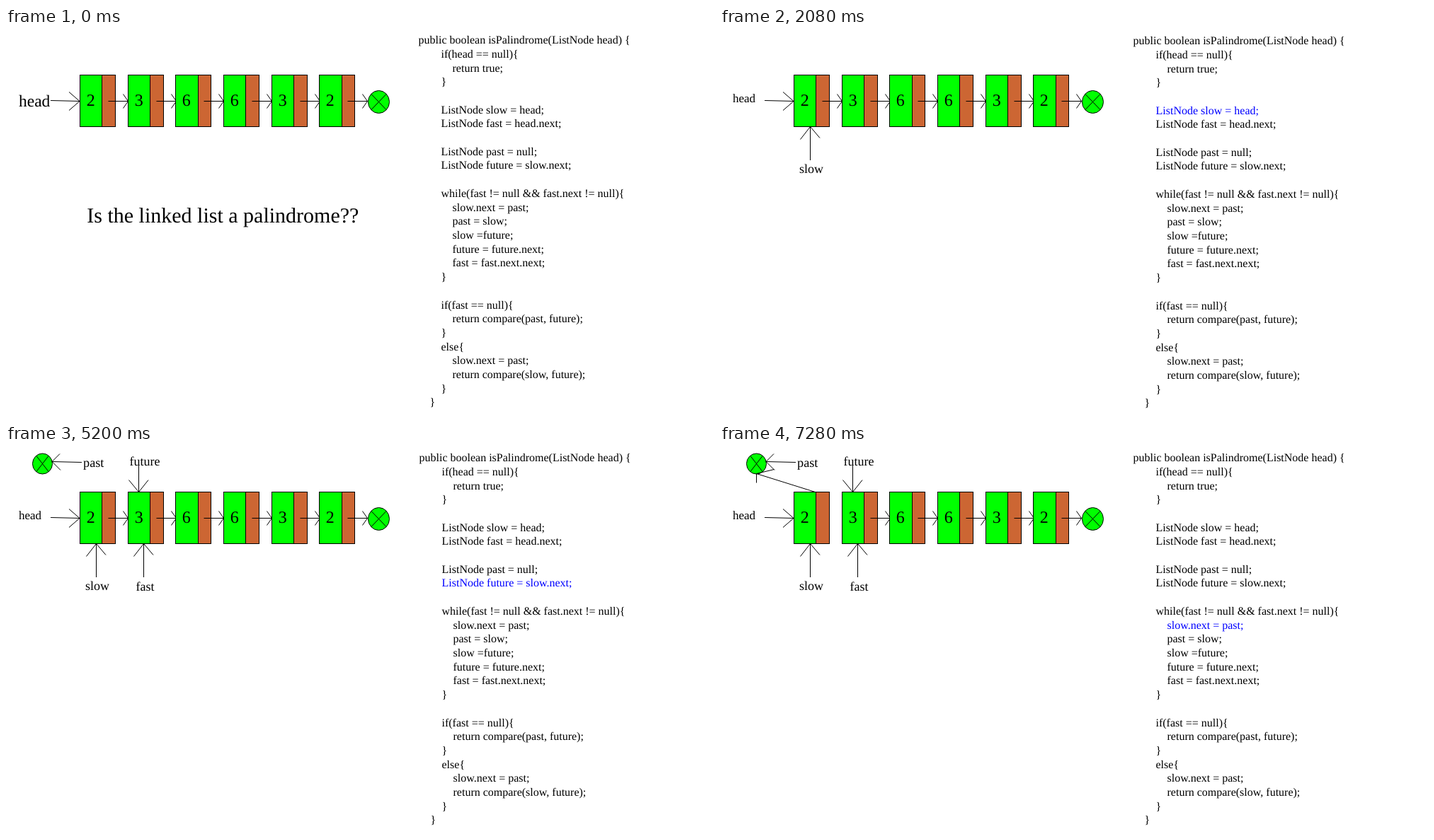
These frames come from a looping animation (1000x550 px, 8000 ms). An HTML page:

```html
<!DOCTYPE html>
<html lang="en">
<head>
<meta charset="utf-8">
<title>Linked list palindrome</title>
<style>
  html, body { margin: 0; width: 100%; height: 100%; overflow: hidden; background: #fff; }
  svg { display: block; width: 1000px; height: 550px; }
  text {
    font-family: "Liberation Serif", "Times New Roman", serif;
    white-space: pre;
    text-rendering: geometricPrecision;
  }
</style>
</head>
<body>
<svg id="stage" viewBox="0 0 1000 550"></svg>
<script>
const STEP = 1040, LOOP = 8000;
const INK = '#000', BLUE = '#0000ff', NOTE = '#000099', GREEN = '#00ff00', BROWN = '#cc6633';
const stage = document.getElementById('stage');

const code = `public boolean isPalindrome(ListNode head) {
        if(head == null){
            return true;
        }

        ListNode slow = head;
        ListNode fast = head.next;

        ListNode past = null;
        ListNode future = slow.next;

        while(fast != null && fast.next != null){
            slow.next = past;
            past = slow;
            slow =future;
            future = future.next;
            fast = fast.next.next;
        }

        if(fast == null){
            return compare(past, future);
        }
        else{
            slow.next = past;
            return compare(slow, future);
        }
    }`.split('\n');

// Code line highlighted at each step
const activeLine = [-1, 1, 5, 6, 8, 9, 11, 12];

const escape = s => s.replace(/&/g, '&amp;');
const text = (x, y, size, str, fill = INK, extra = '') =>
  `<text x="${x}" y="${y}" font-size="${size}" fill="${fill}" ${extra}>${escape(str)}</text>`;
const path = d => `<path d="${d}" fill="none" stroke="${INK}"/>`;

// Shaft from tail to tip, with both barbs given relative to the tip
const arrow = (tail, [x, y], a, b) =>
  path(`M${tail}L${x},${y}M${x + a[0]},${y + a[1]}L${x},${y}L${x + b[0]},${y + b[1]}`);

function nullMark(x, y, rx, ry, dx, dy) {
  return `<ellipse cx="${x}" cy="${y}" rx="${rx}" ry="${ry}" fill="${GREEN}" stroke="${INK}"/>` +
    path(`M${x - dx},${y - dy}l${2 * dx},${2 * dy}m0,${-2 * dy}l${-2 * dx},${2 * dy}`);
}

function node(value, i, linked) {
  const left = 103.9 + 67.7 * i;
  const x = Math.round(left) + 0.5, divider = Math.round(left + 31.4) + 0.5;
  const box = (from, to, fill) =>
    `<rect x="${from}" y="66.5" width="${to - from}" height="73" fill="${fill}" stroke="${INK}"/>`;
  return box(x, divider, GREEN) + box(divider, x + 50, BROWN) +
    text(x + 15.3, 110, 24, value, INK, 'text-anchor="middle"') +
    (linked ? arrow([x + 40, 103.5], [x + 68, 103.5], [-7, -10], [-7, 10]) : '');
}

function codeBlock(step) {
  const shift = step ? 0 : -1;
  return code.map((line, i) => {
    const x = 583.5 + shift, y = Math.round(23.2 + 19.7 * i) + shift;
    if (i !== activeLine[step]) return text(x, y, 16, line);
    const brace = line.endsWith('{') ? `<tspan fill="${INK}">{</tspan>` : '';
    return text(x, y, 16, line.replace('{', ''), BLUE).replace('</text>', brace + '</text>');
  }).join('');
}

function scene(step) {
  let out = codeBlock(step);
  out += step < 2 ? text(18, 111, 23.5, 'head') : text(18, 105, 17, 'head');
  out += [2, 3, 6, 6, 3, 2].map((v, i) => node(String(v), i, i || step < 7)).join('');
  out += arrow([63, 102.5], [104, 103.5], [-15, -13], [-15, 13]);
  out += nullMark(526.5, 104.5, 15, 16, 10.5, 11);

  if (step === 0) out += text(114.3, 275, 30, 'Is the linked list a palindrome??');
  if (step === 1) out += text(220, 427, 30, 'head != null', NOTE);
  if (step === 6) out += text(117.6, 428, 30, 'fast != null && fast.next != null', NOTE);

  if (step >= 2) out += text(112, 205, 18, 'slow') +
    arrow([127.5, 187], [127.5, 139.5], [-14, 18], [13.5, 16]);
  if (step >= 3) out += text(183.5, 206, 18, 'fast') +
    arrow([194.5, 187], [194.5, 139.5], [-14, 18], [13.5, 16]);
  if (step >= 4) out += nullMark(51.5, 26.5, 14, 14.5, 8.5, 11) + text(109, 31, 18.3, 'past') +
    arrow([107, 24.5], [65, 23.5], [11, -11], [12, 12]);
  if (step >= 5) out += text(174.5, 29, 18, 'future') +
    arrow([187.5, 28], [187.5, 66.5], [-14, -17], [13.5, -17]);
  if (step >= 7) out += arrow([136, 67], [51.5, 40.5], [0, 13], [25, -6]);
  return out;
}

let shown = -1;
function tick() {
  const step = Math.floor(performance.now() % LOOP / STEP);
  if (step !== shown) stage.innerHTML = scene(shown = step);
  requestAnimationFrame(tick);
}
tick();
</script>
</body>
</html>
```
